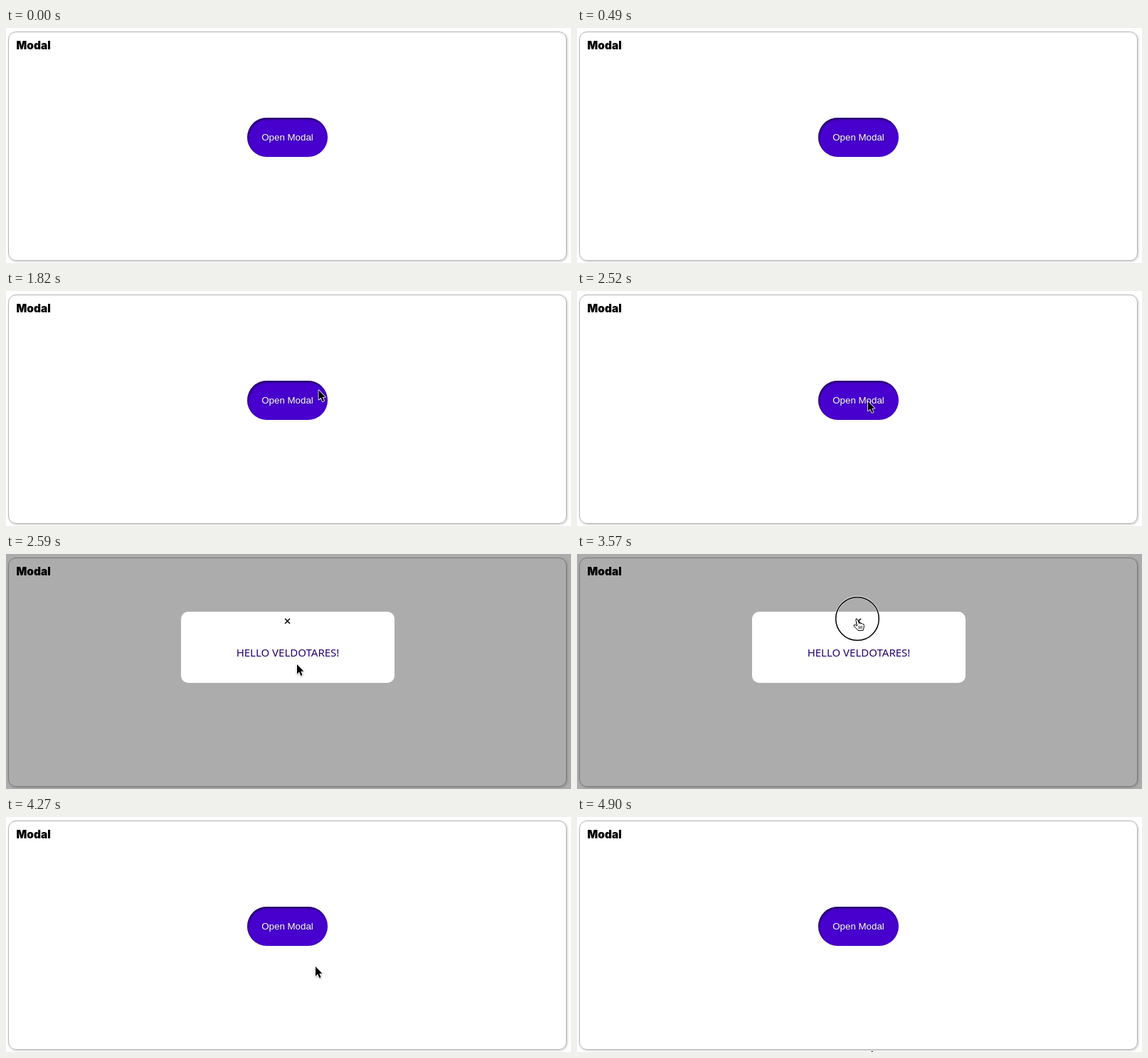
Animation of 794x330 px, one loop 4.97 s. Source, as an HTML page:

```html
<!DOCTYPE html>
<html lang="en">
<head>
<meta charset="utf-8">
<title>Modal</title>
<style>
  html, body { margin: 0; width: 100%; height: 100%; overflow: hidden; background: #fff; }
  #stage { position: relative; width: 794px; height: 330px; overflow: hidden; }
  #stage > * { position: absolute; box-sizing: border-box; }
  .card {
    left: 3px; top: 5px; width: 785px; height: 322px;
    border: 1px solid #b4b4b4; border-radius: 11px;
    box-shadow: 1px 1px 3px rgba(0, 0, 0, .22);
  }
  .title { left: 14.5px; top: 15px; font: 900 15.5px/20px Inter, sans-serif; }
  .button {
    left: 339px; top: 126px; width: 113px; height: 55px; border-radius: 28px;
    background: #4800ce; color: #fff; text-align: center;
    font: 13.333px/55px "Liberation Sans", Arial, sans-serif;
    text-shadow: 1px 1px 2px rgba(0, 0, 0, .35);
    box-shadow: inset 1px 2px 3px rgba(0, 0, 0, .6);
  }
  .overlay { inset: 0; background: rgba(0, 0, 0, .325); }
  .modal {
    position: absolute; left: 246px; top: 81px; width: 300px; height: 100px;
    border-radius: 10px; background: #fff; color: #26006f; text-align: center;
  }
  .modal p { margin: 0; padding-top: 47px; font: 15px/20px "Noto Sans", sans-serif; }
  svg { left: 0; top: 0; }
  .modal svg { position: absolute; left: 145px; top: 9px; }
</style>
</head>
<body>
<div id="stage">
  <div class="card"></div>
  <div class="title">Modal</div>
  <div class="button">Open Modal</div>
  <div class="overlay" id="overlay">
    <div class="modal">
      <svg width="9" height="9"><path d="M1 .8 8 7.8M8 .8 1 7.8" stroke="#000" stroke-width="1.5"/></svg>
      <p>HELLO VELDOTARES!</p>
    </div>
  </div>
  <svg width="794" height="330">
    <g id="ring" fill="none">
      <circle r="30.5" stroke="#fff" stroke-opacity=".7" stroke-width="2.8"/>
      <circle r="30.3" stroke="#000" stroke-width="1.5"/>
    </g>
    <g id="cursor" stroke-linejoin="round">
      <path id="arrow" d="M0 0V13.4L3.1 10.6 5.4 16 7.6 15 5.3 9.8H9.4Z"
        stroke="#fff" stroke-width="1.6" paint-order="stroke"
        style="filter: drop-shadow(0 1px 1px rgba(0, 0, 0, .3))"/>
      <g id="hand" stroke="#000" fill="#fff">
        <path d="M-2.2 1.2Q-1-.8 .5 1L2.4 6.5Q4 5 5 6.6 6.6 5.6 7.4 7.4 9.4 7 9.4 9.5L9 13 8 16.4H1Q-2 13-5 10-5 7.8-3 8.4L-.4 9.8Z"/>
        <path d="M2 10.2 2.4 14M4.2 10V14M6.2 9.8V14" stroke-width=".8"/>
      </g>
    </g>
  </svg>
</div>
<script>
const LOOP = 4970, STEP = 70;

// Pointer stops: time, x, y
const stops = [
  [1400, 583, 6], [1890, 431, 147], [2380, 411, 156], [2520, 409, 155],
  [2940, 409, 155], [3220, 394, 91], [3990, 394, 91],
  [4270, 435, 210], [4550, 435, 210], [4900, 414, 328],
];

const find = id => document.getElementById(id);
const show = (id, visible) => { find(id).style.display = visible ? '' : 'none'; };
const place = (id, [x, y]) => find(id).setAttribute('transform', `translate(${x} ${y})`);
const within = (t, start, end) => t >= start && t < end;

function pointerAt(t) {
  const next = stops.findIndex(stop => stop[0] > t);
  if (next === 0) return stops[0].slice(1);
  if (next < 0) return stops[stops.length - 1].slice(1);
  const [t0, x0, y0] = stops[next - 1], [t1, x1, y1] = stops[next];
  const u = (t - t0) / (t1 - t0), eased = u * u * (3 - 2 * u);
  return [x0 + (x1 - x0) * eased, y0 + (y1 - y0) * eased];
}

function draw(now) {
  const t = Math.floor(now % LOOP / STEP) * STEP;
  const pointer = pointerAt(t);
  const overClose = within(t, 3220, 3710);
  place('cursor', pointer);
  place('ring', pointer);
  show('cursor', t >= 1400);
  show('arrow', !overClose);
  show('hand', overClose);
  show('ring', within(t, 2380, 2520) || within(t, 3570, 3710));
  show('overlay', within(t, 2590, 3710));
}

const start = performance.now();
function tick() {
  draw(performance.now() - start);
  requestAnimationFrame(tick);
}
tick();
</script>
</body>
</html>
```
